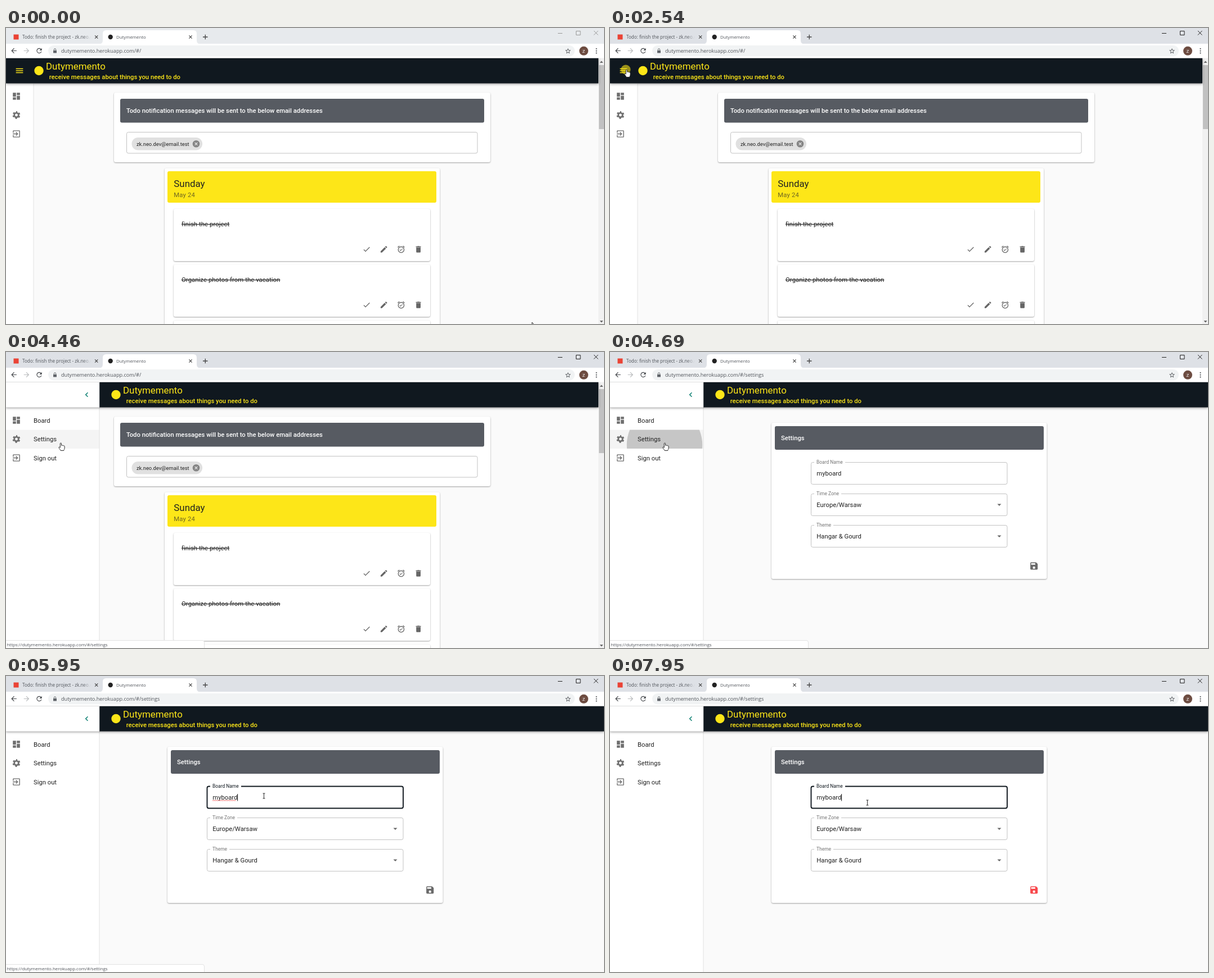
Write an HTML page that moves like this. It is 1063 by 527 pixels and loops after 8000 ms.

```html
<!DOCTYPE html>
<html lang="en">
<head>
<meta charset="utf-8">
<title>Dutymemento</title>
<style>
  html, body { margin: 0; width: 100%; height: 100%; overflow: hidden; background: #fff; }
  svg { display: block; width: 100vw; height: 100vh; }
  text { font: 11.25px Roboto, sans-serif; fill: #212121; white-space: pre; }
  .ui { font-family: "Open Sans", sans-serif; fill: #50545a; }
  .med { font-weight: 500; }
  .card { fill: #fff; filter: drop-shadow(0 1.4px 1.3px rgba(0,0,0,.36)); }
  .lift { fill: #fff; filter: drop-shadow(0 3px 3.5px rgba(0,0,0,.5)); }
  .done { text-decoration: line-through; letter-spacing: .09px; }
  .line { fill: none; stroke: #c2c2c2; }
  .label { font-size: 8.44px; fill: #757575; }
  .bar { filter: drop-shadow(0 1.5px 2px rgba(0,0,0,.45)); }
</style>
</head>
<body>
<svg id="stage" viewBox="0 0 1063 527" preserveAspectRatio="none"></svg>
<script>
const LOOP = 8000;
const DARK = '#10181f', YELLOW = '#fde618', GREY = '#6f6f6f', SLATE = '#575b62';
const SITE = 'dutymemento.herokuapp.com/#/';

const ICONS = {
  dash: 'M13 3V9H21V3M13 21H21V11H13M3 21H11V15H3M3 13H11V3H3Z',
  exit: 'M19 3H5C3.9 3 3 3.9 3 5V9H5V5H19V19H5V15H3V19A2 2 0 0 0 5 21H19A2 2 0 0 0 21 19V5C21 3.9 20.1 3 19 3M10.1 15.6 11.5 17 16.5 12 11.5 7 10.1 8.4 12.7 11H3V13H12.7Z',
  check: 'M21 7 9 19 3.5 13.5 4.9 12.1 9 16.2 19.6 5.6Z',
  pencil: 'M20.7 7C21.1 6.6 21.1 6 20.7 5.6L18.4 3.3C18 2.9 17.4 2.9 17 3.3L15.1 5.1 18.9 8.9M3 17.3V21H6.8L17.8 9.9 14.1 6.2Z',
  alarm: 'M10.5 14.5 8.4 12.4 7.3 13.5 10.5 16.6 16.5 10.6 15.5 9.6ZM12 20A7 7 0 0 1 12 6 7 7 0 0 1 12 20M12 4A9 9 0 0 0 12 22 9 9 0 0 0 12 4M7.9 3.4 6.6 1.9 2 5.7 3.3 7.2M22 5.7 17.4 1.9 16.1 3.4 20.7 7.2Z',
  bin: 'M19 4H15.5L14.5 3H9.5L8.5 4H5V6H19M6 19A2 2 0 0 0 8 21H16A2 2 0 0 0 18 19V7H6Z',
  save: 'M15 9H5V5H15M12 19A3 3 0 0 1 12 13 3 3 0 0 1 12 19M17 3H5C3.9 3 3 3.9 3 5V19A2 2 0 0 0 5 21H19A2 2 0 0 0 21 19V7Z',
  chevron: 'M15.4 16.6 10.8 12 15.4 7.4 14 6 8 12 14 18Z',
  menu: 'M3 6H21V8H3ZM3 11H21V13H3ZM3 16H21V18H3Z',
  down: 'M7 10 12 15 17 10Z',
  back: 'M20 11V13H8L13.5 18.5 12.1 19.9 4.2 12 12.1 4.1 13.5 5.5 8 11Z',
  reload: 'M17.7 6.3A8 8 0 1 0 19.7 14H17.7A6 6 0 1 1 16.2 7.8L13 11H20V4Z',
  star: 'M12 15.4 8.2 17.7 9.2 13.4 5.9 10.5 10.3 10.1 12 6.1 13.7 10.1 18.1 10.5 14.8 13.4 15.8 17.7M22 9.2 14.8 8.6 12 2 9.2 8.6 2 9.2 7.5 14 5.8 21 12 17.3 18.2 21 16.5 14Z'
};

const POINTERS = {
  arrow: 'M0 0V11L2.6 8.6 4.4 12.6 6 11.9 4.3 8H7.8Z',
  hand: 'M-1.2 .9C-1.2-.3 1-.3 1 .9V4.3C1.3 3.6 2.8 3.8 2.9 4.6 3.3 4.1 4.6 4.2 4.8 5 5.3 4.7 6.6 5 6.6 6V9C6.6 11 5.4 12 5.2 13.5H-.4C-.6 12-2.9 10.3-3.6 8.2-3.9 7-2.3 6.8-1.2 8.2Z',
  beam: 'M-2-4.5H2M0-4.5V4.5M-2 4.5H2'
};

const rect = (x, y, w, h, fill, more = '') =>
  `<rect x="${x}" y="${y}" width="${w}" height="${h}" ${fill ? `fill="${fill}"` : ''} ${more}/>`;
const circle = (x, y, r, fill, more = '') => `<circle cx="${x}" cy="${y}" r="${r}" fill="${fill}" ${more}/>`;
const path = (d, stroke, more = '') => `<path d="${d}" fill="none" stroke="${stroke}" ${more}/>`;
const text = (x, y, str, more = '') => `<text x="${x}" y="${y}" ${more}>${str}</text>`;
const icon = (name, x, y, fill = GREY, size = 16.9, more = '') =>
  `<path d="${ICONS[name]}" fill="${fill}" fill-rule="evenodd" transform="translate(${x - size / 2} ${y - size / 2}) scale(${size / 24})" ${more}/>`;
const cross = (x, y, r, more = '') =>
  path(`M${x - r} ${y - r}l${2 * r} ${2 * r}m0 ${-2 * r}l${-2 * r} ${2 * r}`, '#444', more);
const size = px => `style="font-size:${px}px"`;

function cog(x, y) {
  const dash = Math.PI * 16.6 / 12;
  return `<g transform="translate(${x} ${y}) rotate(-90) scale(.703)" fill="none" stroke="${GREY}">
    <circle r="5.4" stroke-width="3.9"/>
    <circle r="8.3" stroke-width="3.2" stroke-dasharray="${dash}" stroke-dashoffset="${dash / 2}"/></g>`;
}

function task(id, y, str) {
  return rect(298, y, 456, 93, '', `rx="3" class="card"`) +
    rect(298, y, 456, 93, '', `rx="3" class="lift" id="${id}"`) +
    text(312, y + 31, str, 'class="done"') +
    ['check', 'pencil', 'alarm', 'bin'].map((n, i) => icon(n, 641 + i * 30.7, y + 72, '#666', 15.5)).join('');
}

function field(y, name, gap, value, drop) {
  return rect(357.5, y + .5, 348.5, 39, '', `rx="3" class="line" ${drop ? '' : 'id="border"'}`) +
    rect(363, y - 2, gap, 5, '#fff') +
    text(367, y + 3.2, name, `class="label" ${drop ? '' : 'id="label"'}`) +
    text(367.3, y + 24, value, drop ? '' : 'id="value"') +
    (drop ? icon('down', 692, y + 20, '#666') : '');
}

const board = `<g id="board">
  ${rect(192, 115, 669, 124, '', 'rx="3" class="card"')}
  ${rect(203, 126, 647, 42.5, SLATE, 'rx="3"')}
  ${text(214, 151, 'Todo notification messages will be sent to the below email addresses', 'class="med" fill="#fff" style="fill:#fff"')}
  ${rect(214.5, 185.5, 623.5, 37.5, '', 'rx="3" class="line"')}
  ${rect(223.5, 195, 125.5, 22.5, '#e0e0e0', 'rx="11.2"')}
  ${text(232, 209.5, 'zk.neo.dev@email.test', size(9.3))}
  ${circle(338, 206.3, 6.3, '#858585')}${cross(338, 206.3, 2.3, 'style="stroke:#e8e8e8" stroke-width="1.2"')}
  ${rect(282, 249.5, 489, 300, '', 'rx="3" class="card"')}
  ${rect(287, 255, 478, 56, YELLOW, 'rx="3"')}
  ${text(298.3, 283, 'Sunday', size(16.9))}
  ${text(298.3, 301, 'May 24', 'style="fill:#6f6721;letter-spacing:.2px"')}
  ${task('lift1', 322, 'finish the project')}
  ${task('lift2', 421, 'Organize photos from the vacation')}
  ${rect(298, 520.5, 456, 60, '', 'rx="3" class="card"')}
  ${rect(1053, 53, 10, 474, '#f1f1f1')}${rect(1054, 66, 9, 114, '#c1c1c1')}
  <path d="M1055.5 62l3-3.5 3 3.5zM1055.5 521l3 3.5 3-3.5z" fill="#666"/>
</g>`;

const settings = `<g id="settings">
  ${rect(287, 126, 489.5, 278, '', 'rx="3" class="card"')}
  ${rect(293, 132, 478, 42, SLATE, 'rx="3"')}
  ${text(304, 157, 'Settings', 'class="med" style="fill:#fff"')}
  ${field(196, 'Board Name', 55, 'myboard', false)}
  ${field(252, 'Time Zone', 48, 'Europe/Warsaw', true)}
  ${field(308, 'Theme', 34, 'Hangar &amp; Gourd', true)}
  <path id="wavy" fill="none" stroke="#e53935" stroke-width=".8" d="M367 222.3${'l1.5-1.3l1.5 1.3'.repeat(14)}"/>
  ${rect(411, 210, 1, 12.5, '#111', 'id="caret"')}
  ${icon('save', 753.7, 381, '#6a6a6a', 17.5, 'id="save"')}
</g>`;

const rows = [['Board', 121.5], ['Settings', 155], ['Sign out', 188.5]];
const drawer = `<g clip-path="url(#drawerClip)">
  ${rect(0, 98, 166, 429, '#fff')}
  ${rect(0, 105, 166, 33.5, '#000', 'id="hoverBoard"')}
  ${rect(0, 138.5, 166, 33.5, '#000', 'id="hoverSettings"')}
  <g clip-path="url(#rowClip)">${circle(97, 165, 67, '#000', 'id="ripple"')}</g>
  ${icon('dash', 18.5, 121.5)}${cog(18.5, 155)}${icon('exit', 18.5, 188.5)}
  <g id="names">${rows.map(([s, y]) => text(49, y + 4, s)).join('')}</g>
</g>
<path id="edge" fill="none" stroke="#e0e0e0"/>`;

const header = `<g class="bar">${rect(0, 53.5, 1063, 45, DARK, 'id="bar"')}</g>
  <g id="burger">${circle(28, 74, 8.5, YELLOW, 'id="press"')}${icon('menu', 24, 76, YELLOW)}</g>
  <g id="brand">${circle(58.5, 76, 8.2, YELLOW)}
    ${text(71, 73.6, 'Dutymemento', `style="font-size:16.9px;fill:${YELLOW}"`)}
    ${text(76.7, 91, 'receive messages about things you need to do', `class="med" style="fill:${YELLOW}"`)}</g>
  <g clip-path="url(#topClip)">${rect(0, 53.5, 166, 45, '#fff')}
    ${path('M0 98.5H166M166 53V98', '#e0e0e0')}${icon('chevron', 143.5, 76, '#00796b')}</g>`;

const chrome = `${rect(0, 0, 1063, 28.5, '#e7eaed', 'id="strip"')}
  <path d="M166 28.5Q172 28 172 22V10Q172 4 178 4H333Q339 4 339 10V22Q339 28 345 28.5Z" fill="#fff"/>
  ${rect(0, 28, 1063, 25.5, '#fff')}
  ${rect(13.5, 11.5, 9, 9, '#ea4335')}
  ${text(29, 19, 'Todo: finish the project - zk.neo.d', 'class="ui" style="font-size:8.1px;fill:url(#fade)"')}
  ${cross(160.7, 16, 2.6, 'stroke-width="1.2"')}
  ${circle(185.7, 16, 4.2, '#222')}${text(196, 19, 'Dutymemento', 'class="ui" style="font-size:7.8px"')}
  ${cross(328, 16, 2.6, 'stroke-width="1.2"')}${path('M350 16H358.5M354.3 11.8V20.2', '#444', 'stroke-width="1.3"')}
  <g id="controls" fill="none">
    <path d="M981 9.5H989M1013.5 5.5H1021V12.5H1013.5ZM1045 5L1052.5 12.5M1052.5 5L1045 12.5"/></g>
  ${icon('back', 14, 40.5, '#44474b', 14.5)}
  <g transform="translate(73) scale(-1 1)">${icon('back', 36.5, 40.5, '#babcbe', 14.5)}</g>
  ${icon('reload', 59, 40.5, '#44474b', 14)}
  ${rect(75, 31, 936, 19.5, '#f1f3f4', 'rx="9.7"')}
  ${rect(84, 40, 6, 4.5, '#5f6368', 'rx=".6"')}${path('M85.3 40V38.6A1.7 1.7 0 0 1 88.7 38.6V40', '#5f6368')}
  ${text(98, 44, '', 'class="ui" id="url" style="font-size:9.1px"')}
  ${icon('star', 999, 41, '#505357', 12)}
  ${circle(1027, 40.8, 8, '#6d4c41')}${text(1027, 43.6, 'Z', 'text-anchor="middle" style="font-size:8px;fill:#fff"')}
  ${[37, 40.8, 44.6].map(y => circle(1049.5, y, 1.1, '#44474b')).join('')}`;

document.getElementById('stage').innerHTML = `<defs>
    <clipPath id="drawerClip">${rect(0, 53, 49, 474, '', 'id="drawerBox"')}</clipPath>
    <clipPath id="topClip">${rect(0, 53, 0, 46, '', 'id="topBox"')}</clipPath>
    <clipPath id="rowClip">${rect(0, 138.5, 166, 33.5)}</clipPath>
    <linearGradient id="fade" gradientUnits="userSpaceOnUse" x1="136" x2="151" y1="0" y2="0">
      <stop stop-color="#50545a"/><stop offset="1" stop-color="#50545a" stop-opacity="0"/></linearGradient>
  </defs>
  ${rect(0, 0, 1063, 527, '#fafafa')}${board}${settings}${drawer}${header}
  <g id="status"><path d="M-1 513.5H349Q352.5 513.5 352.5 517V528H-1Z" fill="#fff" stroke="#e2e2e2"/>
    ${text(1.5, 524, `https://${SITE}settings`, 'class="ui" style="font-size:7.9px"')}</g>
  ${chrome}
  <path id="pointer" fill="#fff" stroke="#222" stroke-width=".95" stroke-linejoin="round"/>`;

const el = {};
document.querySelectorAll('[id]').forEach(n => el[n.id] = n);
const set = (id, name, v) => el[id].setAttribute(name, v);
const show = (id, v) => set(id, 'opacity', +v);

const ramp = (t, a, b) => Math.min(1, Math.max(0, (t - a) / (b - a)));
const smooth = u => u * u * (3 - 2 * u);
const mix = (a, b, u) => a + (b - a) * u;
const pulse = (t, a, b, c, d) => ramp(t, a, b) * (1 - ramp(t, c, d));

// Pointer stops: time, x, y
const TRACK = [
  [0, 935, 524], [40, 935, 524], [430, 404, 365], [1300, 404, 365], [1370, 404.5, 359.5],
  [2140, 37, 101], [2200, 37, 101], [2370, 29.5, 74], [2650, 29.5, 74], [3230, 47.5, 144],
  [3310, 50, 150], [3370, 50, 150], [3600, 97.5, 162], [4760, 97.5, 162], [5260, 379, 209],
  [5330, 379, 209], [5580, 458.5, 213.5], [7090, 458.5, 213.5], [7330, 457.5, 225.5], [LOOP, 457.5, 225.5]
];
const TYPED = '12345';
const ADD = [6330, 6490, 6640, 6950, 7030];
const REMOVE = [7410, 7490, 7640, 7800, 7950];

function pointerAt(t) {
  const i = Math.max(1, TRACK.findIndex(k => k[0] > t));
  const [a, b] = [TRACK[i - 1], TRACK[i]];
  const u = smooth(ramp(t, a[0], b[0]));
  return [mix(a[1], b[1], u), mix(a[2], b[2], u)];
}

function pointerKind(x, y, inSettings) {
  const within = (l, r, top, bottom) => x >= l && x <= r && y >= top && y <= bottom;
  if (inSettings && within(357, 706, 196, 236)) return 'beam';
  if (!inSettings && (within(298, 754, 322, 415) || within(298, 754, 421, 514))) return 'hand';
  return within(0, 42, 59, 93) || within(0, 166, 105, 205) ? 'hand' : 'arrow';
}

function draw(t) {
  const inSettings = t >= 4620, active = t >= 2540;
  const open = smooth(ramp(t, 2620, 2850));
  const width = mix(49.5, 166.5, open);

  set('strip', 'fill', active ? '#dee1e6' : '#e7eaed');
  set('controls', 'stroke', active ? '#222' : '#999');
  el.url.textContent = SITE + (inSettings ? 'settings' : '');
  set('board', 'display', inSettings ? 'none' : 'inline');
  set('settings', 'display', inSettings ? 'inline' : 'none');
  set('bar', 'width', inSettings ? 1063 : 1053);

  show('lift1', pulse(t, 290, 430, 1550, 1700));
  show('lift2', pulse(t, 200, 280, 290, 400));

  set('drawerBox', 'width', width);
  set('topBox', 'width', 166.5 * open);
  set('edge', 'd', `M${width - .5} 99V527`);
  set('brand', 'transform', `translate(${137 * open})`);
  show('burger', open < .3);
  show('names', open);
  set('press', 'r', mix(8.5, 16, ramp(t, 2540, 2700)));
  show('press', active ? .58 * (1 - ramp(t, 2560, 2760)) : 0);

  show('hoverBoard', .04 * pulse(t, 2900, 3000, 3210, 3320));
  show('hoverSettings', .045 * pulse(t, 3210, 3310, 4880, 5050));
  set('ripple', 'r', mix(10, 112, ramp(t, 4520, 4825)));
  show('ripple', .19 * pulse(t, 4500, 4560, 4800, 5050));
  show('status', pulse(t, 3760, 3900, 6010, 6160));

  const focus = t >= 5720, hover = ramp(t, 5220, 5300);
  const ink = Math.round(mix(194, 40, hover));
  set('border', 'style', focus ? `stroke:${DARK};stroke-width:${mix(1, 1.9, ramp(t, 5720, 5800))}` : `stroke:rgb(${ink},${ink},${ink})`);
  set('label', 'style', focus ? `fill:${DARK}` : '');
  const count = ADD.filter(k => t >= k).length - REMOVE.filter(k => t >= k).length;
  el.value.textContent = 'myboard' + TYPED.slice(0, count);
  if (inSettings) set('caret', 'x', 367 + el.value.getComputedTextLength());
  show('caret', focus);
  show('wavy', t >= 5800 && t < ADD[0]);
  const red = ramp(t, ADD[0], 6480);
  set('save', 'fill', `rgb(${mix(106, 248, red)},${mix(106, 72, red)},${mix(106, 76, red)})`);

  const [x, y] = pointerAt(t);
  set('pointer', 'd', POINTERS[pointerKind(x, y, inSettings)]);
  set('pointer', 'transform', `translate(${x} ${y})`);
}

function tick() {
  draw(performance.now() % LOOP);
  requestAnimationFrame(tick);
}
tick();
</script>
</body>
</html>
```
